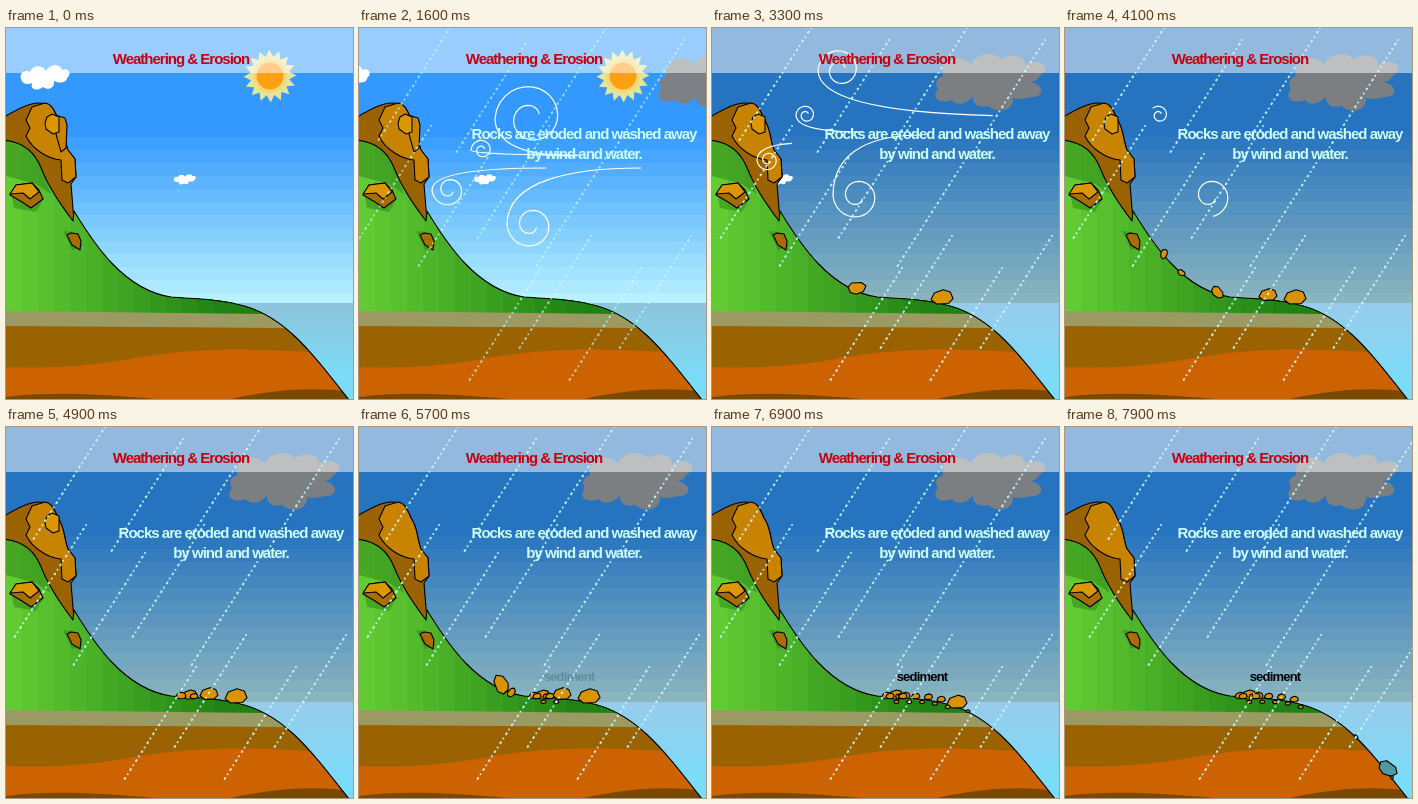
Write an HTML page that moves like this. It is 347 by 371 pixels and loops after 8 s.

```html
<!DOCTYPE html>
<html lang="en">
<head>
<meta charset="utf-8">
<title>Weathering and erosion</title>
<style>
  html, body { margin: 0; width: 100%; height: 100%; overflow: hidden; }
  svg { display: block; width: 100vw; height: 100vh; }
  text { font: bold 15px "Liberation Sans", Arial, sans-serif; letter-spacing: -1px; text-anchor: middle; }
  .small { font-size: 13px; letter-spacing: -.8px; }
  .line { stroke: #000; stroke-width: 1.1; stroke-linejoin: round; }
  #wind { fill: none; stroke: #fff; stroke-width: 1.2; }
</style>
</head>
<body>
<svg viewBox="0 0 347 371" preserveAspectRatio="none">
  <defs>
    <linearGradient id="sea" x2="0" y2="1">
      <stop id="seaTop" offset="0"/>
      <stop offset=".8" stop-color="#7bdcf8"/>
    </linearGradient>
    <clipPath id="land">
      <path id="landShape" d="M-3 112C18 114 29 124 36 142C43 160 54 176 67 193L68 183C88 216 118 262 165 269C190 271 212 271 230 276C276 285 303 321 343 372V380H-3Z"/>
    </clipPath>
    <path id="puff" d="M0 12C-2 6 4 2 9 5C12-3 22-2 25 4C29-4 40-3 41 3C48 0 51 7 46 11C45 17 37 16 33 14C34 21 27 24 22 20C15 25 9 22 11 16C6 18 1 17 0 12Z" fill="#fff"/>
  </defs>

  <g id="sky"></g>
  <g id="sun">
    <polygon id="rays" fill="#e5e59a"/>
    <circle cx="264" cy="48" r="17" fill="#f3d779"/>
    <circle cx="264" cy="48" r="13.5" fill="#fca014"/>
  </g>
  <rect id="dusk" width="347" height="275"/>
  <rect y="275" width="347" height="96" fill="url(#sea)"/>
  <g id="fairClouds">
    <use href="#puff" x="15" y="39"/>
    <use href="#puff" transform="translate(168 147) scale(.45 .42)"/>
  </g>
  <path id="storm" fill="#808080" fill-opacity=".96" d="M231 48C228 33 247 24 259 36C265 24 283 24 289 31C300 24 314 28 313 37C326 29 340 39 331 45C325 50 326 53 318 54C331 56 334 68 321 69C312 70 308 72 301 70C302 82 287 87 276 78C266 81 260 75 261 68C254 78 243 77 240 72C226 77 219 69 226 61C222 55 225 50 231 48Z"/>
  <rect width="347" height="45" fill="#fff" opacity=".5"/>

  <path class="line" fill="#9a6200" d="M-2 89C12 81 23 75 33 75C44 75 48 80 52 91C59 101 58 112 62 122L69 131L70 149L65 156L68 193L30 175L-2 120Z"/>
  <g clip-path="url(#land)">
    <g id="grass"></g>
    <path d="M0 112C18 114 29 124 36 142L45 166L30 156L0 148ZM5 163L38 170L30 184L8 180ZM57 203L68 204L77 218L66 222Z" fill="#257a14" opacity=".45"/>
    <path d="M0 283L258 286L347 292V371H0Z" fill="#9c9a63"/>
    <path d="M0 298L280 300H347V371H0Z" fill="#9a6200"/>
    <path d="M0 339C60 341 95 336 135 329C190 320 240 320 304 324H347V371H0Z" fill="#cc6200"/>
    <path d="M0 369C40 364 80 365 150 371H0ZM225 371C270 361 310 359 347 364V371Z" fill="#7a4900"/>
  </g>
  <use href="#landShape" class="line" fill="none"/>

  <g class="line" fill="#c88400">
    <path d="M26 79L39 75C46 76 48 82 52 91C59 101 58 112 62 122L69 131L70 149L62 155L56 152L55 132C42 131 26 121 20 108L24 100L20 92Z"/>
    <path id="slab" d="M49 87L59 90L61 97L60 120L55 124L50 106Z"/>
    <path id="boulder" fill="#dc9600" d="M41 89L46 86L53 89V104L47 106L40 101L39 95Z"/>
    <path d="M4 167L10 157L26 155L33 162L37 171L25 180L16 174Z" fill="#a86c00"/>
    <path d="M4 166L10 157L26 155L33 164L24 171L17 165Z" fill="#dc9600"/>
    <path d="M61 207L65 205L72 206L75 213L74 222L66 217Z" fill="#a86c00"/>
  </g>
  <g id="rocks" class="line" fill="#d89300"></g>

  <g id="wind"></g>
  <path id="rain" fill="none" stroke="#cff" stroke-width="2.1" stroke-linecap="round" stroke-dasharray="0 4.6 .8 5.2"/>

  <text x="175" y="36" fill="#c8000c">Weathering &amp; Erosion</text>
  <g id="caption" fill="#cff">
    <text x="225" y="111">Rocks are eroded and washed away</text>
    <text x="225" y="131">by wind and water.</text>
  </g>
  <text id="sediment" class="small" x="210" y="254">sediment</text>
</svg>
<script>
const LOOP = 8000, STEP = 100;
const $ = id => document.getElementById(id);
const ramp = (t, a, b) => Math.min(1, Math.max(0, (t - a) / (b - a)));
const mix = (a, b, k) => a + (b - a) * k;
const blend = (from, to, k) => `rgb(${from.map((v, i) => Math.round(mix(v, to[i], k)))})`;
const show = (node, on) => { node.style.display = on ? '' : 'none'; };
const range = (n, fn) => Array.from({ length: n }, (_, i) => fn(i));

function set(node, attrs) {
  for (const key in attrs) node.setAttribute(key, attrs[key]);
  return node;
}
const add = (parent, tag, attrs) =>
  set(parent.appendChild(document.createElementNS('http://www.w3.org/2000/svg', tag)), attrs);

// Stepped gradients of sky and grass
for (let i = 0; i < 14; i++) {
  add($('sky'), 'rect', {
    y: i ? 96 + i * 13 : 0, width: 347, height: i ? 14 : 110,
    fill: blend([51, 153, 255], [184, 241, 255], i / 13),
  });
  add($('grass'), 'rect', {
    x: i * 16, width: 347, height: 371, fill: blend([98, 203, 51], [31, 130, 18], i / 13),
  });
}

$('rays').setAttribute('points', range(32, i => {
  const r = i % 2 ? 19.5 : 26.5, a = i * Math.PI / 16 - 1.6;
  return [264 + r * Math.cos(a), 48 + r * Math.sin(a)];
}).join(' '));

// A gust sweeps left from (x, y), then curls inward around (cx, cy)
function gustPath(x, y, cx, cy, r) {
  const spin = y < cy ? -1 : 1, left = cx - r;
  const curl = range(40, i => {
    const a = Math.PI + spin * i * .23, size = r * (1 - i / 52);
    return [cx + size * Math.cos(a), cy + size * Math.sin(a)];
  });
  return `M${x} ${y}C${mix(x, left, .5)} ${y} ${left} ${mix(y, cy, .2)} ${left} ${cy}L${curl.join(' ')}`;
}

const gusts = [
  { start: 300, shape: [187, 140, 90, 162, 17] },
  { start: 300, shape: [218, 128, 172, 90, 36] },
  { start: 700, shape: [282, 140, 172, 197, 24] },
  { start: 700, shape: [222, 127, 123, 122, 11] },
  { start: 1800, shape: [320, 88, 128, 42, 22] },
  { start: 1800, shape: [93, 115, 56, 132, 11] },
  { start: 2140, shape: [210, 107, 145, 168, 24] },
  { start: 2140, shape: [150, 104, 94, 87, 10] },
].map(({ start, shape }) => ({ start, node: add($('wind'), 'path', { d: gustPath(...shape), pathLength: 1 }) }));

function drawGust({ start, node }, t) {
  const head = ramp(t, start, start + 900), tail = ramp(t, start + 1400, start + 2300);
  show(node, head > tail);
  node.setAttribute('stroke-dasharray', `0 ${tail} ${Math.max(0, head - tail)} 2`);
}

// Height of the slope: steep on the left, a shelf, then down into the water
const ground = x => 271 + (x < 170 ? -86 * ((170 - x) / 103) ** 2 : 100 * (Math.max(0, x - 205) / 136) ** 2);

const CRUMBLE = 5900;
const tumblers = [
  { r: 11, start: 1700, rest: 230, end: CRUMBLE },
  { r: 9, start: 2700, rest: 203, end: CRUMBLE },
  { r: 7, start: 3350, rest: 184 },
  { r: 4, start: 3650, rest: 188 },
  { r: 5, start: 3750, rest: 175 },
  { r: 5, start: 5000, rest: 193 },
  { r: 10, start: 5250, rest: 245, slide: 78 },
  { r: 2, start: 5900, rest: 256, slide: 71 },
  { r: 2.4, start: 6200, rest: 240, slide: 51 },
];
const rubble = range(10, i => ({
  r: i % 2 ? 2.6 : 4.2, drop: i % 2 ? 5 : 0, start: 4300 + i * 110, rest: 178 + i * 6.4, still: true,
}));
const rocks = [...tumblers, ...rubble].map(rock => ({
  ...rock,
  node: add($('rocks'), 'path', {
    d: 'M-1 .2L-.7-.4L.1-.7L.75-.5L1 .1L.6 .55L-.5 .6Z', 'vector-effect': 'non-scaling-stroke',
  }),
}));

function drawRock({ r, start, rest, end = LOOP, slide = 0, drop = 0, still, node }, t) {
  const roll = ramp(t, start, start + 1000);
  show(node, t < end && (still ? roll === 1 : roll > 0));
  const x = (still ? rest : mix(58, rest, roll)) + slide * ramp(t, 7100, 7900);
  const y = ground(x) - r * mix(1, .45, roll) + drop;
  set(node, {
    transform: `translate(${x} ${y}) rotate(${(x - rest) * 28 / r}) scale(${r})`,
    fill: x > 284 ? '#5099a0' : '#d89300',
  });
}

// Rain: three staggered rows of streaks, four repeating poses
const rows = [
  { x: 99, y: 0, gap: 78, sway: 12 },
  { x: 80, y: 98, gap: 59, sway: 28 },
  { x: 190, y: 240, gap: 50, sway: -32 },
];
const rainPath = pose => rows.map(({ x, y, gap, sway }) =>
  range(4, i => `M${x + gap * i + 8 * (pose - 1)} ${y + sway * (i % 2)}l-74 116`).join('')).join('');

function draw(t) {
  const dusk = ramp(t, 1700, 3300);
  $('dusk').setAttribute('opacity', dusk * .25);
  $('sun').setAttribute('opacity', 1 - dusk);
  $('seaTop').setAttribute('stop-color', blend([141, 196, 219], [152, 203, 235], dusk));
  $('fairClouds').setAttribute('transform', `translate(${-t * .033} 0)`);
  $('storm').setAttribute('transform', `translate(${Math.max(0, 2850 - t) * .061} 0)`);
  $('caption').setAttribute('opacity', ramp(t, 200, 900));
  $('sediment').setAttribute('opacity', ramp(t, 5550, 6350));
  show($('slab'), t < 2700);
  show($('boulder'), t < 5250);
  gusts.forEach(gust => drawGust(gust, t));
  rocks.forEach(rock => drawRock(rock, t));
  set($('rain'), {
    d: rainPath(t / STEP % 4),
    opacity: t < 1000 ? 0 : mix(.4, .85, ramp(t, 900, 2200)),
  });
}

const start = performance.now();
function frame(now) {
  const t = Math.max(0, now - start) % LOOP;
  draw(Math.floor(t / STEP) * STEP);
  requestAnimationFrame(frame);
}
draw(0);
requestAnimationFrame(frame);
</script>
</body>
</html>
```
